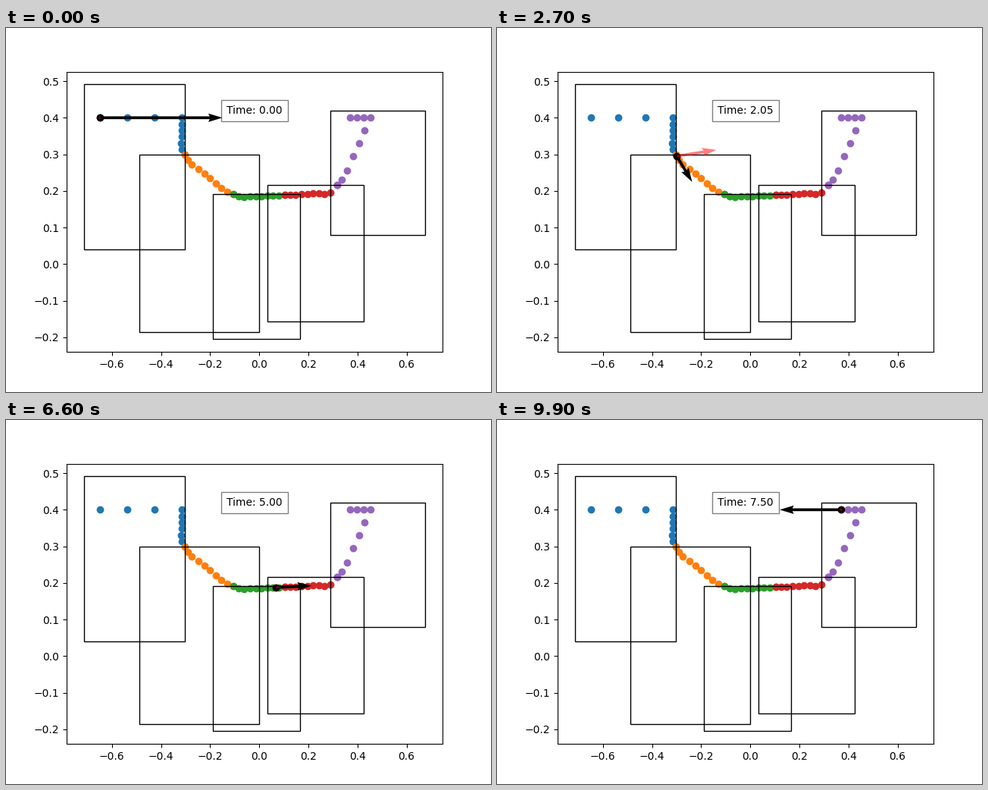
These frames come from a looping animation (640 px wide and 480 px high, 10000 ms). A matplotlib script:

```python
from math import comb, perm

import matplotlib.pyplot as plt
import numpy as np
from matplotlib.animation import FuncAnimation
from matplotlib.patches import Rectangle

DEG = 9
N = DEG + 1
FRAMES = 100
SPANS = [2.0, 1.75, 1.5, 1.25, 1.0]
KNOTS = np.concatenate([[0], np.cumsum(SPANS)])

# Safe boxes: left, right, bottom, top
BOXES = [
    (-0.715, -0.302, 0.040, 0.491),
    (-0.4867, -0.002, -0.1865, 0.2985),
    (-0.1903, 0.1677, -0.205, 0.1905),
    (0.035, 0.424, -0.157, 0.2155),
    (0.2912, 0.677, 0.079, 0.4185),
]
START, V_START = (-0.65, 0.4), (0.5, 0.0)
END, V_END = (0.37, 0.4), (-0.25, 0.0)


def diff_row(first, order):
    """Row that takes the forward difference of control points at `first`."""
    row = np.zeros(N * len(SPANS))
    for j in range(order + 1):
        row[first + j] = (-1) ** (order - j) * comb(order, j)
    return row


def solve_axis(p0, v0, p1, v1, pins):
    """Shortest control polygon along one axis with smooth joints."""
    total = N * len(SPANS)
    rows, vals = [], []

    def fix(row, val):
        rows.append(row)
        vals.append(val)

    starts = [p0, v0 * SPANS[0] / DEG, 0, 0]
    ends = [p1, v1 * SPANS[-1] / DEG, 0, 0]
    for k in range(4):
        fix(diff_row(0, k), starts[k])
        fix(diff_row(total - 1 - k, k), ends[k])
        for s in range(len(SPANS) - 1):
            ratio = (SPANS[s] / SPANS[s + 1]) ** k
            joint = N * (s + 1)
            fix(diff_row(joint - 1 - k, k) - ratio * diff_row(joint, k), 0)
    for seg, val in pins.items():
        fix(diff_row(N * seg, 0), val)

    steps = np.array([diff_row(N * s + i, 1)
                      for s in range(len(SPANS)) for i in range(DEG)])
    a = np.array(rows)
    m = len(rows)
    kkt = np.block([[steps.T @ steps, a.T], [a, np.zeros((m, m))]])
    rhs = np.concatenate([np.zeros(total), vals])
    return np.linalg.lstsq(kkt, rhs, rcond=None)[0][:total]


xs = solve_axis(START[0], V_START[0], END[0], V_END[0], {1: BOXES[0][1]})
ys = solve_axis(START[1], V_START[1], END[1], V_END[1],
                {1: BOXES[1][3], 2: BOXES[2][3], 4: BOXES[3][3]})
curves = np.column_stack([xs, ys]).reshape(len(SPANS), N, 2)


def bezier(t, order=0):
    """Position or derivative of the path at time t."""
    s = min(np.searchsorted(KNOTS, t, side="right") - 1, len(SPANS) - 1)
    u = min((t - KNOTS[s]) / SPANS[s], 1.0)
    pts = np.diff(curves[s], n=order, axis=0)
    n = DEG - order
    weights = [comb(n, i) * u**i * (1 - u) ** (n - i) for i in range(n + 1)]
    return perm(DEG, order) / SPANS[s] ** order * (np.array(weights) @ pts)


fig, ax = plt.subplots(figsize=(6.4, 4.8), dpi=100)
for pts in curves:
    ax.scatter(pts[:, 0], pts[:, 1])
for left, right, bottom, top in BOXES:
    ax.add_patch(Rectangle((left, bottom), right - left, top - bottom, fill=False))


def arrow(vec, **style):
    return ax.quiver(*START, *vec, angles="xy", scale_units="xy", scale=1, **style)


dot = ax.scatter(*START, color="black")
vel = arrow(V_START, color="black")
acc = arrow((0, 0), color="red", alpha=0.5)
label = ax.text(0.5, 0.85, "", transform=ax.transAxes, ha="center",
                bbox=dict(facecolor="w", alpha=0.5, pad=5))
ax.autoscale_view()


def update(i):
    t = KNOTS[-1] * i / (FRAMES - 1)
    pos = bezier(t)
    for artist in (dot, vel, acc):
        artist.set_offsets([pos])
    vel.set_UVC(*bezier(t, 1))
    acc.set_UVC(*bezier(t, 2))
    label.set_text(f"Time: {t:.2f}")
    return dot, vel, acc, label


anim = FuncAnimation(fig, update, frames=FRAMES, interval=100, repeat=True,
                     repeat_delay=0)
plt.show()
```
